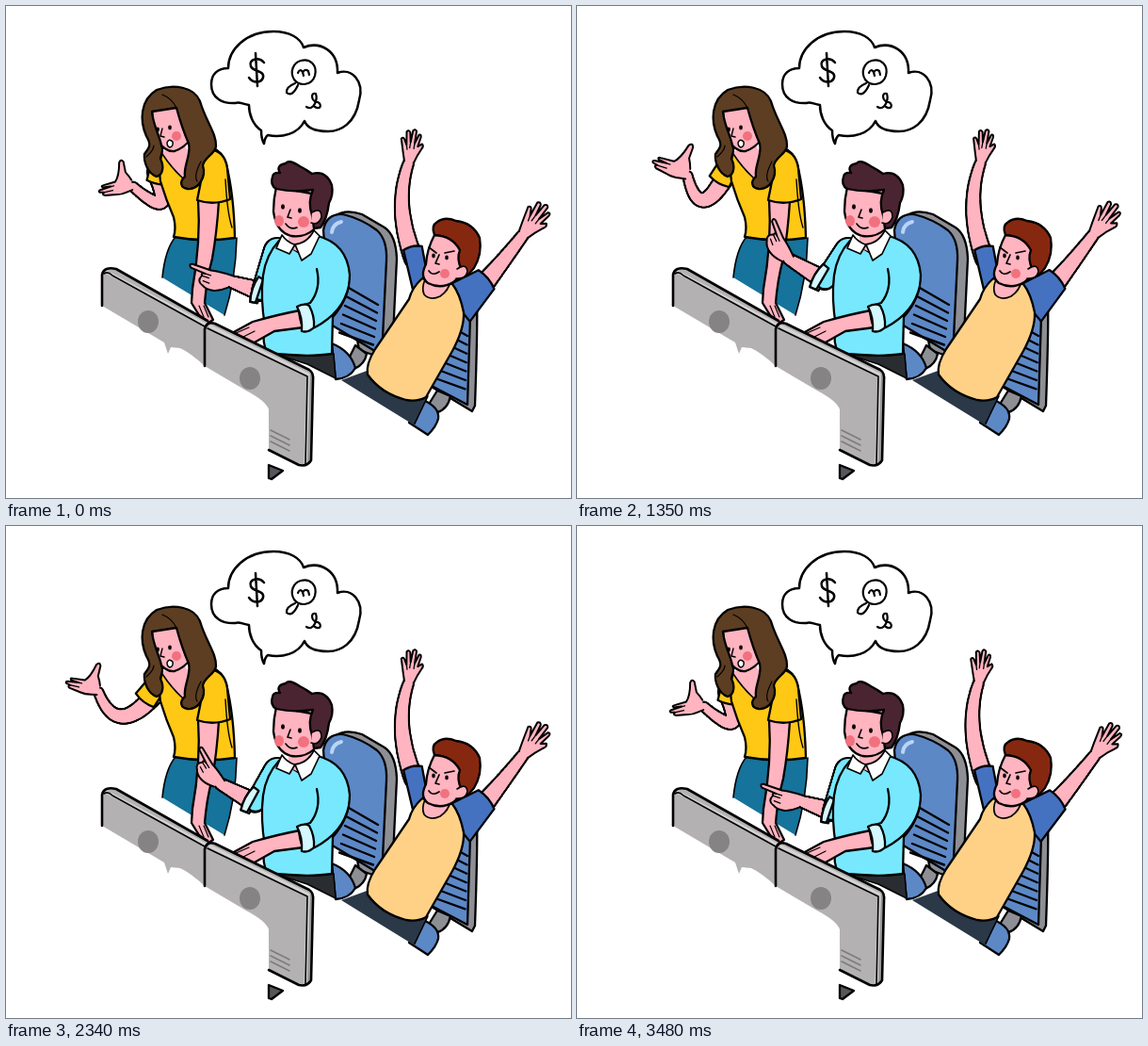
An HTML page with a canvas that plays this animation: 600x522 px, repeating every 3.51 s.

```html
<!DOCTYPE html>
<html lang="en">
<head>
<meta charset="utf-8">
<title>Office team</title>
<style>
html, body { margin: 0; width: 600px; height: 522px; overflow: hidden; background: #fff; }
canvas { display: block; }
</style>
</head>
<body>
<canvas id="stage" width="600" height="522"></canvas>
<script>
const ctx = document.getElementById('stage').getContext('2d');
const LOOP = 3510, CHEER = LOOP / 3;
const SKIN = '#ffb4c0', BLUSH = '#f2717f', YELLOW = '#ffc814', CYAN = '#78e8ff', CUFF = '#d5f8ff',
  SLEEVE = '#4472c0', CHAIR = '#5d88c6', RIM = '#8d8f94', NAVY = '#2a3847', GREY = '#b3b1b2';
ctx.lineJoin = ctx.lineCap = 'round';

const ease = u => (1 - Math.cos(Math.PI * Math.min(1, Math.max(0, u)))) / 2;
const mix = (a, b, u) => a.map((v, i) => v + (b[i] - v) * u);

function shape(d, fill, width = 2.3, stroke = '#000') {
  const path = new Path2D(d);
  if (fill) { ctx.fillStyle = fill; ctx.fill(path); }
  if (width) { ctx.strokeStyle = stroke; ctx.lineWidth = width; ctx.stroke(path); }
}
const line = (d, width = 1.6, stroke) => shape(d, null, width, stroke);

function dot(x, y, rx, ry = rx, fill = '#000') {
  ctx.fillStyle = fill;
  ctx.beginPath();
  ctx.ellipse(x, y, rx, ry, 0, 0, 7);
  ctx.fill();
}

// Tapered limb through three joints, outlined in black.
function limb(a, mid, b, r0, r1, color = SKIN) {
  const c = mid.map((v, i) => 2 * v - (a[i] + b[i]) / 2);
  for (const [grow, fill] of [[1.1, '#000'], [-1.1, color]])
    for (let u = 0; u <= 1; u += 0.02) {
      const [x, y] = mix(mix(a, c, u), mix(c, b, u), u), r = r0 + (r1 - r0) * u + grow;
      dot(x, y, r, r, fill);
    }
}

// Tapered piece of cloth from a to b.
function cloth(a, b, w0, w1, fill) {
  const len = Math.hypot(b[0] - a[0], b[1] - a[1]);
  const nx = (a[1] - b[1]) / len, ny = (b[0] - a[0]) / len;
  const at = (p, w) => `${p[0] + nx * w} ${p[1] + ny * w}`;
  const bulge = `${b[0] + ny * 4} ${b[1] - nx * 4}`;
  shape(`M${at(a, w0)}L${at(b, w1)}Q${bulge} ${at(b, -w1)}L${at(a, -w0)}Z`, fill);
}

// Hand outlines run from the wrist at 0,0 to the fingertip at 1,0.
const HANDS = {
  open: ['M0-.15C.2-.17 .3-.23 .5-.18L.85-.12Q.95-.07 .85-.03L.98 .0Q1.03 .05 .95 .07L.62 .1L.86 .13Q.92 .19 .82 .19L.45 .21Q.3 .34 .2 .75Q.12 .86 .07 .74L.08 .42Q0 .28-.04 .15',
    'M.84-.03L.58-.03M.62 .1L.52 .1'],
  point: ['M0-.16C.2-.36 .42-.4 .56-.32Q.72-.28 .65-.12Q.7-.06 .6-.05L.95-.04Q1.04 .02 .95 .05L.5 .07Q.3 .12 0 .14',
    'M.65-.12L.48-.11M.58-.22L.43-.22M.6-.05L.46-.04'],
  raised: ['M0-.15L.22-.22L.66-.35Q.74-.3 .66-.25L.5-.16L.9-.22Q.98-.17 .9-.11L.6-.05L.96-.03Q1.04 .03 .96 .08L.58 .08L.86 .17Q.9 .24 .8 .24L.5 .19L.6 .31Q.54 .38 .45 .32L.22 .22L0 .15',
    'M.6-.05L.42-.05M.58 .08L.42 .08M.5-.16L.36-.12']
};
function hand(kind, wrist, tip) {
  const dx = tip[0] - wrist[0], dy = tip[1] - wrist[1], size = Math.hypot(dx, dy);
  const [outline, creases] = HANDS[kind];
  ctx.save();
  ctx.translate(...wrist);
  ctx.rotate(Math.atan2(dy, dx));
  ctx.scale(size, size);
  shape(outline, SKIN, 2 / size);
  line(creases, 1.3 / size);
  ctx.restore();
}

// A pose is elbow, wrist and fingertip.
const low = [164, 208, 133, 190, 99, 198], lifted = [134, 206, 117, 178, 80, 166],
  wide = [124, 202, 98, 174, 64, 163], drooped = [122, 202, 97, 174, 63, 170];
const askKeys = [[0, low], [990, low], [1350, lifted], [1600, lifted], [1900, wide], [2010, wide],
  [2640, drooped], [3060, wide], [3270, lifted], [3480, low], [LOOP, low]];
const ahead = [271, 303, 238, 292, 195, 275], upright = [260, 289, 232, 250, 222, 218],
  wagging = [263, 291, 224, 268, 208, 226], sinking = [269, 302, 236, 290, 199, 264];
const pointKeys = [[0, ahead], [120, ahead], [480, upright], [800, wagging], [2200, wagging],
  [2640, sinking], [2900, ahead], [LOOP, ahead]];

const joints = p => [p.slice(0, 2), p.slice(2, 4), p.slice(4)];
function poseAt(keys, t) {
  const i = keys.findIndex(k => k[0] > t);
  const [t0, a] = keys[i - 1], [t1, b] = keys[i];
  return joints(mix(a, b, ease((t - t0) / (t1 - t0))));
}

// 0 with both arms to the left, 1 with both to the right and apart.
function cheerAt(t) {
  let c = t % CHEER;
  if (c < 250) c += CHEER;
  return c > CHEER + 80 ? ease((c - CHEER - 250) / 350)
    : c < 640 ? ease((c - 250) / 350) : 1 - ease((c - 680) / 550);
}

function bubble() {
  line('M271 132C262 126 258 115 258 105C251 104 247 101 244 103C230 104 218 98 218 83C218 72 225 66 236 66C236 46 255 27 284 27C301 27 313 34 316 44C333 37 353 47 352 71C367 65 381 80 375 100C371 125 355 133 342 133C330 133 320 130 317 122C310 136 293 140 278 137Q275 139 274 146Q271 141 271 132', 2.5);
  line('M265 50L267 85M274 60C268 53 257 57 260 64C262 70 275 68 273 76C271 82 262 82 258 76', 2.5);
  line('M313 58C323 55 331 63 328 74C325 84 312 86 306 78C301 70 305 60 313 58M310 71Q312 66 315 70L316 74M315 71Q317 66 321 69L322 73', 2.2);
  line('M307 82Q297 86 298 92Q304 97 310 84M319 107C327 112 331 99 329 93C323 91 324 102 331 102C336 104 334 111 328 107', 2.2);
}

function woman(t) {
  const shoulder = [160, 176], [elbow, wrist, tip] = poseAt(askKeys, t);
  limb(shoulder, elbow, wrist, 10, 5);
  hand('open', wrist, tip);
  cloth([166, 160], mix(shoulder, elbow, 0.34), 10, 12, YELLOW);

  shape('M180 245Q169 258 166 288L232 328Q244 290 245 246Z', '#16739b', 0);
  line('M180 245Q169 258 166 288M232 328Q244 290 245 246');
  shape('M166 156Q161 168 164 186Q170 206 178 224Q181 236 178 245Q210 251 243 246Q242 200 234 168Q230 154 218 150L190 160Z', YELLOW);
  shape('M204 205Q207 250 198 300L197 315L205 328L215 336L220 333L211 315Q213 290 219 268Q224 240 226 207Z', SKIN);
  line('M205 318L210 330M210 318L215 330', 1.2);
  shape('M214 152Q232 152 235 172L238 205Q220 212 203 206L207 186', YELLOW);
  line('M233 184Q235 220 240 235', 1.4);

  shape('M165 155Q174 172 187 183L200 165L188 145Z', SKIN, 0);
  line('M166 157Q176 172 187 182');
  shape('M155 110Q156 130 161 143Q169 155 179 154Q190 150 195 142L185 106Z', SKIN);
  shape('M160 89C178 82 200 86 206 101C212 122 224 136 223 149C222 157 211 160 209 169C213 182 204 195 193 194C185 193 184 186 190 181C188 170 197 158 194 146Q187 130 181 108Q168 110 155 112C156 126 164 140 165 148C168 152 165 156 164 162C168 170 167 179 160 181C151 178 146 166 147 157C152 150 155 148 149 138C142 122 142 100 160 89Z', '#5d3e22');
  line('M181 108Q176 98 166 94M207 165Q199 180 203 186M149 160Q157 153 157 148', 1.2);
  dot(181, 138, 5, 5, BLUSH);
  dot(161, 131, 1.9, 2.4);
  dot(174, 129, 1.9, 2.4);
  line('M166 130L164 138L168 139', 1.4);
  shape('M171 145Q173 140 177 144Q178 149 174 150Q171 149 171 145', '#fff', 1.5);
}

function middleChair() {
  shape('M349 223Q360 215 378 221L402 235Q414 243 415 268L411 350Q409 370 395 372L375 365Z', RIM);
  shape('M337 238Q340 220 358 221Q378 226 394 238Q405 248 404 270L400 352Q399 366 390 365L345 338Z', CHAIR);
  line('M346 240Q347 231 356 229', 4, '#b9d4f5');
  for (let i = 0; i < 6; i++)
    line(`M${364 - i * 2} ${299 + i * 9.5}L${395 - i} ${317 + i * 8.5}`, 2.4);
  shape('M371 360L383 369Q381 380 370 385L362 378Z', RIM);
  shape('M346 358Q366 366 371 384Q365 395 350 396Z', CHAIR);
}

function pointer(t) {
  shape('M276 366L348 369L350 395L320 380Z', '#292d31', 1.5);
  const [elbow, wrist, tip] = poseAt(pointKeys, t);
  limb(elbow, mix(elbow, wrist, 0.5), wrist, 10, 6);
  hand('point', wrist, tip);
  const armpit = [288, 260];
  cloth(elbow, mix(elbow, wrist, 0.22), 13, 14, CUFF);
  limb(armpit, mix(armpit, elbow, 0.5), elbow, 14, 10, CYAN);
  cloth(mix(elbow, wrist, 0.06), mix(elbow, wrist, 0.22), 13, 14, CUFF);

  shape('M290 249Q276 264 273 286Q270 310 275 340Q271 358 278 368Q320 373 346 369L347 330Q365 310 365 285Q362 252 331 244L312 262Z', CYAN);
  shape('M312 323Q290 327 262 335L240 347L262 358L285 345L316 341Z', SKIN);
  line('M242 348L258 341M250 352L264 345', 1.2);
  shape('M330 279Q335 300 323 315L310 319Q312 333 316 345L328 341Q358 325 364 297', CYAN);
  shape('M309 319Q317 315 322 318Q328 329 327 341Q321 347 314 345Q315 330 309 319Z', CUFF);
  shape('M300 239L324 236L326 250L313 262L300 256Z', SKIN, 0);
  shape('M293 243L287 257L301 263L307 253L314 270L324 263L333 244L327 238Q320 252 306 253Q298 250 293 243Z', '#fff', 1.7);

  shape('M287 192Q284 205 284 218Q287 240 303 244Q317 246 327 237L330 200Z', SKIN);
  shape('M287 194Q280 190 283 181Q284 176 291 177Q286 169 297 167Q299 162 312 170Q318 173 325 178Q340 174 346 190Q348 200 343 209Q341 226 334 235L327 236L325 222Q320 208 326 195Q305 198 287 194Z', '#4a2430');
  shape('M325 219Q335 213 335 224Q332 233 324 230', SKIN, 1.6);
  dot(290, 228, 5, 6, BLUSH);
  dot(316, 229, 6, 6, BLUSH);
  dot(294, 213, 2, 2.7);
  dot(312, 217, 2, 2.7);
  line('M302 216L299 224L303 225M297 231Q302 238 309 235', 1.6);
}

function cheerer(t) {
  shape('M486 290L499 298Q502 310 498 424L495 430L452 404Z', RIM);
  shape('M480 292L494 298L490 423L450 402Z', CHAIR);
  for (let i = 0; i < 7; i++)
    line(`M${474 - i * 3} ${341 + i * 9}L${490 - i * 0.4} ${350 + i * 9.4}`, 2.2);
  shape('M458 408L472 414Q469 428 458 431L448 424Z', RIM);
  shape('M443 418Q461 426 459 438Q457 446 448 455L428 442Z', CHAIR);
  shape('M386 386L356 397L434 445L448 414Z', NAVY, 0);
  line('M434 443L448 414');

  const p = cheerAt(t);
  const [elbowL, wristL, tipL] = joints(mix([421, 214, 429, 165, 435, 131], [409, 208, 396, 169, 384, 135], p));
  const [elbowR, wristR, tipR] = joints(mix([522, 277, 549, 242, 573, 210], [534, 280, 572, 250, 597, 234], p));
  const shoulderL = [433, 268], shoulderR = [502, 301];
  limb(shoulderL, elbowL, wristL, 10, 5.5);
  limb(shoulderR, elbowR, wristR, 11, 6);
  hand('raised', wristL, tipL);
  hand('raised', wristR, tipR);
  cloth([441, 300], mix([432, 257], [429, 257], p), 9, 10, SLEEVE);
  cloth([478, 317], mix([510, 290], [515, 297], p), 23, 13, SLEEVE);

  shape('M442 289Q431 299 428 311L392 364Q382 380 384 391Q398 411 425 418Q437 420 446 415L474 366Q487 342 486 325Q482 305 474 295Z', '#ffd187');
  shape('M445 290Q441 300 444 306Q450 313 461 308Q470 302 472 292Z', SKIN, 1.7);

  shape('M455 243Q447 258 446 274Q439 287 448 294Q462 301 475 293L489 280L484 243Z', SKIN);
  shape('M455 243Q451 233 458 229Q466 223 478 228Q496 230 503 246Q506 263 497 278L490 286L484 280Q478 269 482 259Q474 244 455 243Z', '#86280f');
  shape('M479 279Q489 272 490 282Q488 290 478 289', SKIN, 1.6);
  dot(466, 284, 5, 5, BLUSH);
  dot(454, 265, 1.8, 2.4);
  dot(468, 267, 1.8, 2.4);
  line('M449 256L457 262M466 262L476 260M460 264L456 273L460 274M449 281Q453 287 460 282', 1.7);
}

function monitors() {
  shape('M102 318L102 285Q105 276 117 280L214 333L211 382Q196 368 185 363L175 362L172 369L168 357Z', GREY, 0);
  shape('M211 382L211 342L219 335L322 386Q327 389 326 398L324 482Q320 489 311 487L279 471L279 428Q276 419 255 408Z', GREY, 0);
  shape('M320 392L326 390L324 482L318 487Z', '#98979a', 0);
  line('M106 282L212 338M217 340L321 391L318 486', 3.5, '#d4d3d4');
  line('M104 284Q108 281 113 286L211 340M214 342L320 393L318 486', 1.6);
  line('M102 318L102 285Q104 276 117 279L214 334M211 382L211 343Q213 334 222 337L322 386Q327 389 326 398L324 482Q320 489 311 487L279 471', 2.6);
  dot(151, 335, 11, 12, '#858384');
  dot(259, 395, 11, 12, '#858384');
  for (let y = 450; y < 466; y += 6) line(`M281 ${y}L301 ${y + 10}`, 1.6, '#7d7b7c');
  shape('M279 487L294 493L282 502L279 501Z', '#55575a');
}

function draw() {
  const t = performance.now() % LOOP;
  ctx.fillStyle = '#fff';
  ctx.fillRect(0, 0, 600, 522);
  bubble();
  woman(t);
  middleChair();
  pointer(t);
  cheerer(t);
  monitors();
  requestAnimationFrame(draw);
}
draw();
</script>
</body>
</html>
```
